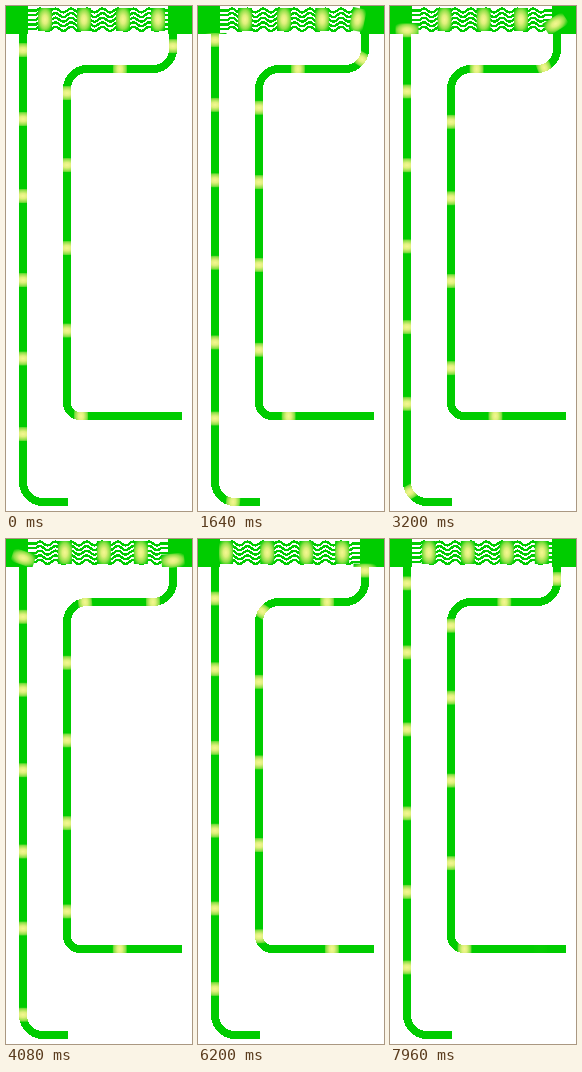
Recreate the animation shown at these times as an HTML page. Size 186x505 px, loop 8000 ms.

```html
<!DOCTYPE html>
<html lang="en">
<head>
<meta charset="utf-8">
<title>Heat flow</title>
<style>
  html, body { margin: 0; width: 100%; height: 100%; overflow: hidden; background: #fff; }
  svg { display: block; width: 186px; height: 505px; }
  .pipe { fill: none; stroke-width: 8; shape-rendering: crispEdges; }
  .fin { fill: none; stroke: #0c0; stroke-width: 2.4; shape-rendering: crispEdges; }
</style>
</head>
<body>
<svg viewBox="0 0 186 505">
  <defs>
    <radialGradient id="glow" r="0.63">
      <stop offset="0" stop-color="#f4f792"/>
      <stop offset="0.3" stop-color="#dff07c"/>
      <stop offset="0.65" stop-color="#90e048"/>
      <stop offset="1" stop-color="#0c0"/>
    </radialGradient>
    <path id="pipes" class="pipe" d="M62 496H37A20 20 0 0 1 17 476V20M167 20V43A20 20 0 0 1 147 63H81A20 20 0 0 0 61 83V397A13 13 0 0 0 74 410H176"/>
    <mask id="inside" maskUnits="userSpaceOnUse" x="0" y="0" width="186" height="505">
      <use href="#pipes" stroke="#fff"/>
      <rect width="186" height="28" fill="#fff"/>
    </mask>
  </defs>
  <path id="route" fill="none" d="M62 496H37A20 20 0 0 1 17 476V21.5A8 8 0 0 1 25 13.5H158A9 9 0 0 1 167 22.5V43A20 20 0 0 1 147 63H81A20 20 0 0 0 61 83V397A13 13 0 0 0 74 410H176"/>
  <g id="fins"></g>
  <use href="#pipes" stroke="#0c0"/>
  <path fill="#0c0" d="M0 0H22V28H0ZM162 0H186V28H162Z"/>
  <g id="pulses" mask="url(#inside)"></g>
</svg>
<script>
  const LOOP = 8000, FADE = 1600;
  const LENGTH = 14, WIDTH = 23;
  // Distances along the route; each pulse moves from one stop to the next per loop.
  const stops = [7, 104.4, 179.9, 258.4, 342.4, 419.4, 488.4, 537.5, 576.5, 615.5,
    650.5, 688.2, 755.6, 824, 896, 979, 1061.5, 1155.4, 1231.4];
  const route = document.getElementById('route');

  function add(parent, tag, attrs) {
    const el = document.createElementNS('http://www.w3.org/2000/svg', tag);
    for (const name in attrs) el.setAttribute(name, attrs[name]);
    return document.getElementById(parent).appendChild(el);
  }

  for (let i = 0; i < 5; i++) {
    const wave = 'q3.9 -4 7.8 0' + 't7.8 0'.repeat(15);
    add('fins', 'path', { class: 'fin', d: `M21 ${4.5 + i * 4.6}h9${wave}H163` });
  }

  const pulses = stops.slice(1).map(() => add('pulses', 'rect', {
    x: -LENGTH / 2, y: -WIDTH / 2, width: LENGTH, height: WIDTH, fill: 'url(#glow)'
  }));

  function draw(now) {
    const t = now % LOOP;
    pulses.forEach((el, i) => {
      const s = stops[i] + (stops[i + 1] - stops[i]) * t / LOOP;
      const p = route.getPointAtLength(s);
      const a = route.getPointAtLength(s - 0.5);
      const b = route.getPointAtLength(s + 0.5);
      const angle = Math.atan2(b.y - a.y, b.x - a.x) * 180 / Math.PI;
      el.setAttribute('transform', `translate(${p.x} ${p.y}) rotate(${angle})`);
    });
    pulses[0].setAttribute('opacity', Math.min(1, t / FADE));
    pulses[pulses.length - 1].setAttribute('opacity', Math.min(1, (LOOP - t) / FADE));
  }

  const start = performance.now();
  function tick() {
    draw(performance.now() - start);
    requestAnimationFrame(tick);
  }
  tick();
</script>
</body>
</html>
```
